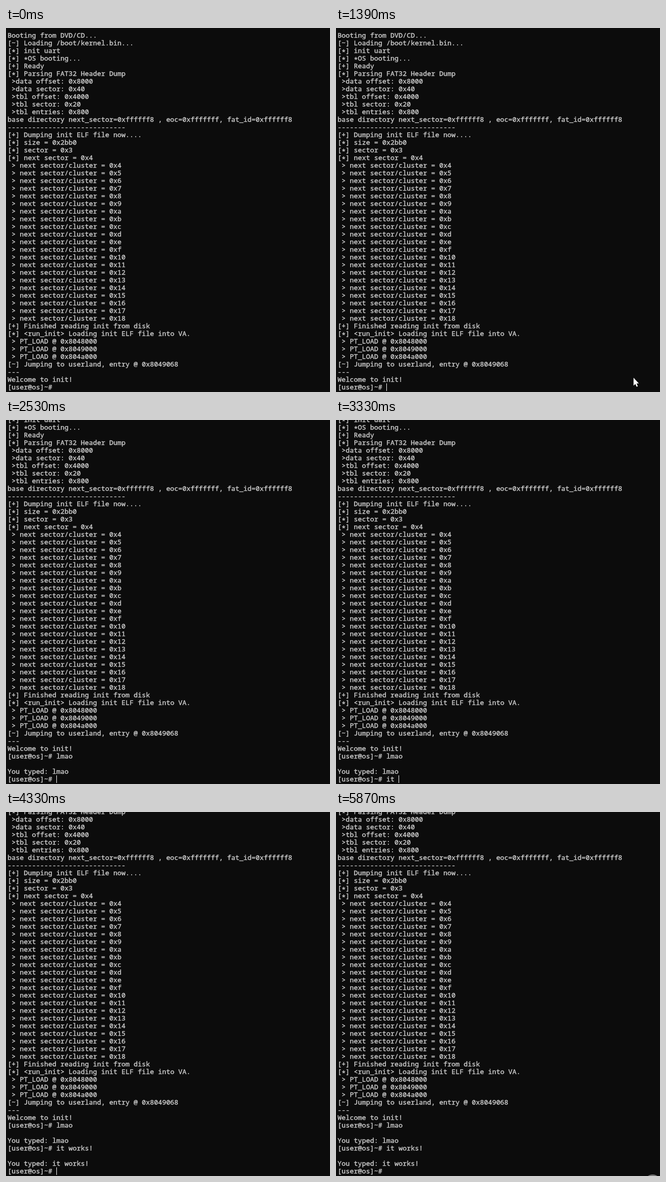
Write an HTML page that moves like this. It is 637 px wide and 714 px high and loops after 5.93 s.

```html
<!DOCTYPE html>
<html lang="en">
<head>
<meta charset="utf-8">
<title>Boot console</title>
<style>
  html, body { margin: 0; width: 100%; height: 100%; overflow: hidden; background: #0c0c0c; }
  svg { display: block; width: 637px; height: 714px; }
  text {
    font: 500 13.333px "Noto Sans Mono", "DejaVu Sans Mono", monospace;
    font-variant-ligatures: none;
    white-space: pre;
    fill: #ccc;
    stroke: #ccc;
    stroke-width: .4px;
  }
  #log, #input, #caret, #pointer, #disc { animation: 5930ms step-end infinite; }
  #log { animation-name: scroll; }
  #input { animation-name: type; }
  #caret { animation-name: blink; }
  #pointer { animation-name: point; }
  #disc { animation-name: disc; }

  @keyframes scroll {
    0% { transform: translateY(0); }
    42.664% { transform: translateY(-45px); }
    73.018%, 100% { transform: translateY(-90px); }
  }
  /* The cover slides one 8px cell per typed character. */
  @keyframes type {
    0% { transform: translateX(0); }
    33.558% { transform: translateX(8px); }
    35.918% { transform: translateX(16px); }
    36.93% { transform: translateX(24px); }
    39.123% { transform: translateX(32px); }
    42.664% { transform: translateX(0); }
    51.602% { transform: translateX(8px); }
    53.288% { transform: translateX(16px); }
    54.974% { transform: translateX(24px); }
    56.661% { transform: translateX(32px); }
    58.347% { transform: translateX(40px); }
    60.708% { transform: translateX(48px); }
    61.72% { transform: translateX(56px); }
    62.9% { transform: translateX(64px); }
    67.453% { transform: translateX(72px); }
    73.018%, 100% { transform: translateX(0); }
  }
  @keyframes blink {
    0% { opacity: 0; }
    5.396% { opacity: 1; }
    14.333% { opacity: 0; }
    23.44% { opacity: 1; }
    84.317% { opacity: 0; }
    89.881% { opacity: 1; }
    98.988%, 100% { opacity: 0; }
  }
  @keyframes point {
    0% { opacity: 0; transform: translate(588px, 700px); }
    2.192% { opacity: 1; transform: translate(588px, 700px); }
    3.204% { opacity: 1; transform: translate(588px, 680px); }
    4.384% { opacity: 1; transform: translate(587px, 673px); }
    5.396% { opacity: 1; transform: translate(585px, 682px); }
    6.408% { opacity: 1; transform: translate(585px, 686px); }
    33.558% { opacity: 0; transform: translate(585px, 686px); }
    89.881% { opacity: 1; transform: translate(585px, 686px); }
    91.062% { opacity: 1; transform: translate(589px, 690px); }
    93.254%, 100% { opacity: 0; transform: translate(589px, 690px); }
  }
  @keyframes disc {
    0% { opacity: 0; }
    98.988%, 100% { opacity: 1; }
  }
</style>
</head>
<body>
<svg viewBox="0 0 637 714" xmlns="http://www.w3.org/2000/svg">
  <rect width="637" height="714" fill="#0c0c0c"/>
  <g id="log"></g>
  <g id="input">
    <rect x="99" y="697" width="640" height="17" fill="#0c0c0c"/>
    <rect id="caret" x="99" y="697" width="1" height="15" fill="#fff"/>
  </g>
  <path id="pointer" d="M0 0V15.5L3.5 12.3L6 17.8L8.4 16.8L6 11.2H10.4Z" fill="#fff"/>
  <circle id="disc" cx="622.5" cy="727.5" r="16.5" fill="#737373"/>
</svg>
<script>
  const LINE = 15, BASELINE = 19, LEFT = 3, STAR_DROP = 2.5;
  const prompt = "[user@os]~# ";
  const clusters = Array.from({ length: 21 }, (_, i) =>
    " > next sector/cluster = 0x" + (i + 4).toString(16));

  const lines = [
    "Booting from DVD/CD...",
    "[~] Loading /boot/kernel.bin...",
    "[*] init uart",
    "[*] *OS booting...",
    "[+] Ready",
    "[*] Parsing FAT32 Header Dump",
    " >data offset: 0x8000",
    " >data sector: 0x40",
    " >tbl offset: 0x4000",
    " >tbl sector: 0x20",
    " >tbl entries: 0x800",
    "base directory next_sector=0xffffff8 , eoc=0xfffffff, fat_id=0xffffff8",
    "-".repeat(29),
    "[+] Dumping init ELF file now....",
    "[*] size = 0x2bb0",
    "[*] sector = 0x3",
    "[*] next sector = 0x4",
    ...clusters,
    "[+] Finished reading init from disk",
    "[*] <run_init> Loading init ELF file into VA.",
    " > PT_LOAD @ 0x8048000",
    " > PT_LOAD @ 0x8049000",
    " > PT_LOAD @ 0x804a000",
    "[~] Jumping to userland, entry @ 0x8049068",
    "---",
    "Welcome to init!",
    prompt + "lmao",
    "",
    "You typed: lmao",
    prompt + "it works!",
    "",
    "You typed: it works!",
    prompt
  ];

  const log = document.getElementById("log");
  const make = (tag, attrs, content = "") => {
    const el = document.createElementNS(log.namespaceURI, tag);
    for (const name in attrs) el.setAttribute(name, attrs[name]);
    el.textContent = content;
    return el;
  };

  lines.forEach((line, i) => {
    const y = BASELINE + LINE * i;
    const text = make("text", { x: LEFT, y, "xml:space": "preserve" });
    // Asterisks sit at mid-height, so they hang below the font's own position.
    for (const part of line.split(/(\*)/).filter(Boolean)) {
      text.append(make("tspan", { y: part === "*" ? y + STAR_DROP : y }, part));
    }
    log.append(text);
  });
</script>
</body>
</html>
```
